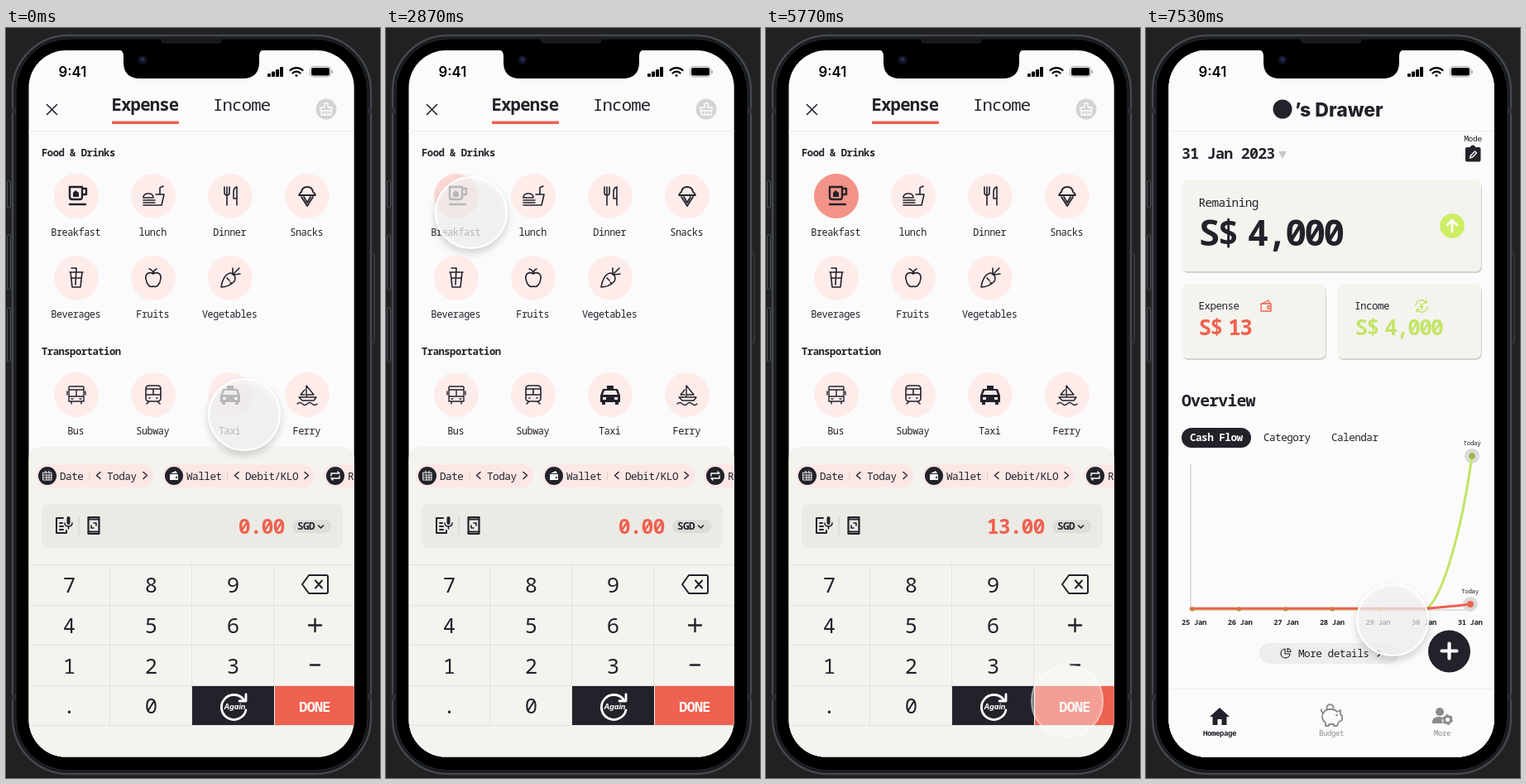
An HTML page for the animation above (7.56 s loop, 452 by 906 pixels).

```html
<!DOCTYPE html>
<html lang="en">
<head>
<meta charset="utf-8">
<title>Expense tracker</title>
<style>
  html, body { margin: 0; width: 100%; height: 100%; overflow: hidden; background: #212121 }
  svg { display: block; width: 452px; height: 906px }
  text { font-family: "Noto Sans Mono", "DejaVu Sans Mono", monospace; letter-spacing: -.04em; white-space: pre }
  .sans { font-family: Inter, "Open Sans", sans-serif; letter-spacing: 0 }
  .big { letter-spacing: -.07em }
  .line { fill: none; stroke: #21222a; stroke-width: 1.6; stroke-linecap: round; stroke-linejoin: round }
  .solid { fill: #21222a; fill-rule: evenodd }
</style>
</head>
<body>
<svg id="stage" viewBox="0 0 452 906"></svg>
<script>
const DARK = '#21222a', RED = '#ef6150', LIME = '#cdee62', PAPER = '#f4f3ee', BG = '#fbfbfb';
const LOOP = 7560, SCROLL = 457;

const plain = (x, y, size, str, o = '') => `<text x="${x}" y="${y}" font-size="${size}" fill="${DARK}" ${o}>${str}</text>`;
// slightly larger, tighter letters for the narrow mono look
const text = (x, y, size, str, o) => plain(x, y, size * 1.07, str, o);
const mid = (x, y, size, str, o = '') => text(x, y, size, str, 'text-anchor="middle" ' + o);
const end = (x, y, size, str, o = '') => text(x, y, size, str, 'text-anchor="end" ' + o);
const box = (x, y, x2, y2, r, fill, o = '') =>
  `<rect x="${x}" y="${y}" width="${x2 - x}" height="${y2 - y}" rx="${r}" fill="${fill}" ${o}/>`;
const dot = (x, y, r, fill, o = '') => `<circle cx="${x}" cy="${y}" r="${r}" fill="${fill}" ${o}/>`;
const line = (d, o = '') => `<path class="line" d="${d}" ${o}/>`;
const solid = (d, o = '') => `<path class="solid" d="${d}" ${o}/>`;
const at = (x, y, body) => `<g transform="translate(${x} ${y})">${body}</g>`;
const ink = (color, width) => `style="stroke:${color};stroke-width:${width}"`;
const paint = color => `style="fill:${color}"`;
const BOLD = 'font-weight="700"', SEMI = 'font-weight="600"', MED = 'font-weight="500"', THIN = 'font-weight="300"';

// ---- category list: label and icon, drawn around 0,0
const sections = [
  ['Food &amp; Drinks', [
    ['Breakfast', line('M-8-11H7V1q0 3-3 3H-5q-3 0-3-3zM7-9h5v7H7M-8 10H11', ink(DARK, 2.4)) + solid('M-4-4L-1-7 3-4V1H-4z')],
    ['lunch', line('M-12 2q0-5 6-5t6 5zM-12 5H2M-12 8H2M-12 11H10L13-2H3M8-2v-8l4-2')],
    ['Dinner', line('M-7-11v7q0 3 3 3t3-3v-7M-4-11V11M8 11V-11q-4 1-4 6V3H8')],
    ['Snacks', line('M-10-1q1-3 3-4 1-6 7-6t7 6q2 1 3 4zM-7 1L0 12 7 1M-4 1l4 7 4-7', ink(DARK, 1.8))],
    ['Beverages', line('M-8-7H8M-7-7L-5 11H5L7-7M-6 0H6M-1 8L0-12H-6')],
    ['Fruits', line('M0-5C-4-8-10-6-9 1-8 8-4 12 0 10 4 12 8 8 9 1 10-6 4-8 0-5zM0-5q0-4 4-6M0-6q-1-4-5-5')],
    ['Vegetables', line('M-11 11C-10 3-6-5 0-6 6-5 7 0 5 4 0 9-5 11-11 11zM3-4L11-12M5-4l7-1M3-6v-6M-4 0l3 3M0 5l2 2')]]],
  ['Transportation', [
    ['Bus', line('M-8-10H8q1 0 1 1V8H-9V-9q0-1 1-1zM-9-6H9M-9 2H9M0-6V2M-6 8v3M6 8v3M-11-4v4M11-4v4M-6 5h2M4 5h2', ink(DARK, 1.4))],
    ['Subway', line('M-9-7q0-4 4-4H5q4 0 4 4V4q0 4-4 4H-5q-4 0-4-4zM-9 0H9M0-7V0M-9-7H9M-5 8l-3 3M5 8l3 3M-5 4h1M4 4h1')],
    ['Taxi', solid('M-12 1L-9-7H-4V-11H4V-7H9L12 1V9H10V12H6V9H-6v3H-10V9H-12zM-9 0H9L7-5H-7zM-9 3h4v3h-4zM5 3h4v3H5z')],
    ['Ferry', line('M-10 3H11L8 7H-6zM-1 3V-11L8 0H-1M-3-6L-8 0h5M-12 11q3-3 6 0t6 0 6 0 6 0', ink(DARK, 1.4))]]],
  ['Health', [
    ['Medical', line('M-8-11H-10V-3a5 5 0 0 0 10 0V-11H-2M-5 2V5a6 5 0 0 0 13 0V1M5-2a3 3 0 1 0 6 0 3 3 0 1 0-6 0', ink(DARK, 2)), 'Check-up'],
    ['Medicine', line('M-10 3L3-10a5 5 0 0 1 7 7L-3 10a5 5 0 0 1-7-7zM-4-3l7 7')],
    ['Hospitalized', line('M-10-10V8H10V-1H-10M-10 4H10M-7 8v3M7 8v3M-5-1V-7H2v6M5-5h5')],
    ['Insurance', line('M0-11L8-8V0q0 6-8 10-8-4-8-10V-8zM-4-1l3 3 5-5')],
    ['Fitness', line('M-11 5a4 4 0 1 0 8 0 4 4 0 1 0-8 0M3 5a4 4 0 1 0 8 0 4 4 0 1 0-8 0M-7 5L-4-2H4M-10-4h7M3-11h4L4-2 7 5H-2L-4-2M-11 10H11', ink(DARK, 1.4))]]],
  ['Others', [
    ['Others', line('M-13-5a8 4 0 1 0 16 0 8 4 0 1 0-16 0v5c0 4 8 5 12 4M3-5V0M-3 2a8 4 0 1 0 16 0 8 4 0 1 0-16 0v4c0 6 16 6 16 0V2M-8-1v4M4 6v4M9 6v4', ink(DARK, 1.5))],
    ['Add', line('M-13 0H13M0-13V13')]]]
];

let list = '', y = 150.5;
for (const [title, items] of sections) {
  list += text(43, y + 4.5, 11.4, title, BOLD);
  y += 52.5;
  items.forEach(([label, icon, second], i) => {
    const x = 85 + 93 * (i % 4), cy = y + 99 * (i >> 2);
    list += dot(x, cy, 27, '#feeceb', label == 'Breakfast' ? 'id="picked"' : '') + at(x, cy, icon)
      + mid(x - .8, cy + 48, 11.1, label) + (second ? mid(x - .8, cy + 63.5, 11.1, second) : '');
  });
  y += 99 * ((items.length - 1) >> 2) + 88.5;
}

// ---- entry screen
const white = w => ink('#fff', w);
const arrows = (l, r) => line(`M${l + 2} 536.5l-4.5 4 4.5 4M${r - 2} 536.5l4.5 4-4.5 4`, ink(DARK, 1.5));
const chip = (x, x2, icon) => box(x, 527, x2, 555, 14, '#fce7e6') + dot(x + 14, 541, 11, DARK) + at(x + 14, 541, icon);

const chips = chip(36, 178, line('M-5-4H5V5H-5zM-5-1H5M-2-6v3M2-6v3M-5 2H5M-1-1V5M2-1V5', white(.9)))
  + text(65, 546, 11.9, 'Date') + text(122, 546, 11.9, 'Today') + arrows(112, 168)
  + chip(189, 373, solid('M-5-2H5V5H-5zM-4-3L2-6 4-3zM2 1h2v2H2z', paint('#fff')))
  + text(218, 546, 11.9, 'Wallet') + text(289, 546, 11.9, 'Debit/KLO') + arrows(279, 363)
  + line('M101 536.5v9M267.5 536.5v9', ink('#e0cfcd', 1))
  + chip(384, 440, line('M-5 0V-3H5L3-5M5 0V3H-5L-3 5', white(1.4))) + text(413, 546, 11.9, 'R');

const keys = ['789', '456', '123', '.0'].map((row, r) =>
  [...row].map((k, c) => mid(76 + 99 * c, 682 + 48.8 * r, 24, k)).join('')).join('');

const entry = `<g clip-path="url(#listClip)"><g id="list">${list}</g></g>`
  + line('M49.5 92.5l12 12M61.5 92.5l-12 12')
  + text(127.5, 100, 19.3, 'Expense', BOLD) + text(250, 100, 19.3, 'Income', THIN)
  + box(128, 112.5, 209, 116, 0, RED)
  + dot(387, 98, 12.5, '#d3d3d3') + at(387, 98, line('M-2-7H2V-2H7V2H-7V-2H-2zM-6 2V7H6V2M-2 7V4M2 7V4', white(1.3)))
  + line('M27 124.5H421', ink('#ececec', 1))
  + `<path fill="${PAPER}" d="M27 881V522q0-16 16-16H405q16 0 16 16V881z"/>` + chips
  + box(43, 575, 407, 628, 8, '#ebeae4')
  + at(69, 601, line('M0-9H-8V9H4V6M-4-3H-1M-4 1H0M-4 5H0', ink(DARK, 2)) + box(4.5, -11, 8.5, -1, 2, DARK) + line('M2-3q0 4 4.500 4t4.500-4M6.500 1V4'))
  + line('M88 590V612', ink('#d2d1cc', 1))
  + at(106, 601, line('M-6.5-10H6.5V10H-6.5zM-6-7.5H6M-6 7.5H6', ink(DARK, 2.2)) + line('M-3 0V3H0M0-3H3V0'))
  + end(336.5, 611, 23.3, '<tspan id="amount"></tspan>', `${SEMI} style="fill:${RED}"`)
  + box(346, 594, 393, 610, 8, '#dedcd7') + text(352, 606, 11.8, 'SGD', SEMI) + line('M377.5 601l3 3 3-3')
  + line('M27 648.5H421M27 697.5H421M27 745.5H421M27 794.5H421M27 842.5H421M125.5 648V842M224.5 648V842M323.5 648V842', ink('#e2e1dc', 1))
  + keys
  + at(374, 672, line('M-8-11H13q2 0 2 2V9q0 2-2 2H-8L-16 0zM0-4.5l8 9M8-4.5l-8 9', ink(DARK, 2)))
  + line('M366 721.5h15M373.5 714v15M368 769.5h11', ink(DARK, 2.4))
  + box(225, 795, 324, 842, 0, DARK) + box(325, 795, 421, 842, 0, RED)
  + line('M287 811A15 15 0 1 0 290 824M290 805v8h-8', white(2.8))
  + plain(276.5, 823, 9, 'Again', 'text-anchor="middle" class="sans" font-weight="700" font-style="italic" style="fill:#fff"')
  + mid(373, 826, 15.6, 'DONE', `${BOLD} style="fill:#fff"`);

// ---- bill screen
const tight = n => `word-spacing="${-n}"`;
const cat = line('M-23 15V-18q0-4 3-2l8 6H12l8-6q3-2 3 2V2M-21 20q0 7 7 7H16q6 0 6-5', ink(DARK, 4.5))
  + line('M-14 4q3-4 6 0M6 4q3-4 6 0M-2 9q5-1 3 3 3 1 0 5-1 2-4 1M-25 10l8 3M-25 22l8-4M-26 16h7', ink(DARK, 2.4))
  + solid('M18 21C10 15 10 10 14 8q3-1 5 2 4-5 8-1 2 5-9 12z') + solid('M-4 2h6l-3 3z');

const bill = box(27, 27, 421, 881, 0, BG) + box(78, 175, 371, 629, 20, PAPER)
  + dot(78, 349, 21, BG) + dot(371, 349, 21, BG)
  + line('M106 348H345', ink('#cbcac7', 1.8) + ' stroke-dasharray="5 5"')
  + dot(224, 174, 59.5, LIME, 'opacity=".48"') + dot(224, 174, 46, LIME) + at(224, 174, cat)
  + mid(228, 260, 14.2, 'Well Done!', `${SEMI} style="fill:#a9c450"`)
  + mid(228, 296, 21.4, 'Bill Confirmation', BOLD)
  + mid(228, 318, 12.55, 'Please verify if your bill', `${THIN} style="fill:#999"`)
  + mid(228, 332, 12.55, 'is accurate!', `${THIN} style="fill:#999"`)
  + text(97.5, 404, 14.8, 'Your Bill', paint('#9b9b9b')) + end(351, 403, 13.7, '31 Jan 23', paint('#9b9b9b'))
  + dot(101, 437, 3.2, RED) + text(114, 442, 14.8, 'Breakfast') + end(351, 442, 13.9, 'S$ 13', `${MED} ${tight(4)}`)
  + line('M99 580H351', ink('#cbcac7', 1.4))
  + text(97.5, 606, 15.4, 'Total', SEMI) + end(351, 604, 15.7, 'S$ 13.00', `${SEMI} ${tight(5)}`)
  + box(103, 699, 346, 747.5, 24, DARK) + mid(224.5, 728, 13.6, 'Correct', `${SEMI} style="fill:${LIME}"`)
  + box(103, 768, 346, 816.5, 24, '#c9c9cb') + mid(224.5, 797, 13.6, 'Modify', SEMI);

// ---- home screen
const GREY = '#8b8b8b';
const card = (x, y, x2, y2) => box(x + 1, y + 2, x2 + 1, y2 + 2, 7, '#d2d2d0') + box(x, y, x2, y2, 7, PAPER);
const days = [25, 26, 27, 28, 29, 30, 31];

const home = box(27, 27, 421, 881, 0, BG)
  + dot(165, 98, 11.5, DARK)
  + plain(180, 106.5, 23, '’s Drawer', 'class="sans" font-weight="800"')
  + line('M27 124.5H421', ink('#ececec', 1))
  + text(43, 158, 17.1, '31 Jan 2023', SEMI) + solid('M160 149h10l-5 9z', paint('#c6c6c6'))
  + mid(395, 137, 9, 'Mode')
  + box(386, 144, 404.5, 161.5, 2, DARK) + dot(395, 144.5, 3, DARK) + line('M391.5 157l1-3 5-5 2 2-5 5z', white(1.4))
  + card(43, 184, 405, 294)
  + text(63.5, 216, 13.4, 'Remaining') + text(63.5, 263, 40.5, 'S$ 4,000', `class="big" ${BOLD} ${tight(10)}`)
  + dot(370, 239, 14.8, LIME) + line('M370 246V232.5M364 238l6-6 6 6', white(2.8))
  + card(43, 309, 217, 399) + card(231, 309, 405, 399)
  + text(63.5, 340, 11.7, 'Expense') + text(63.5, 371, 24.6, 'S$ 13', `class="big" ${BOLD} ${tight(6)} style="fill:${RED}"`)
  + at(145, 336, line('M-6-3H6V6H-6zM-5-3L3-7 5-3M2 0H6V3H2z', ink(RED, 1.3)))
  + text(252, 340, 11.7, 'Income') + text(252.5, 371, 24.6, 'S$ 4,000', `class="big" ${BOLD} ${tight(6)} style="fill:#c3e466"`)
  + at(333, 336, line('M-7-1A7 7 0 0 1 5-5M7 1A7 7 0 0 1-5 5M6-7V-4H3M-6 7V4H-3M-2-3L0 0 2-3M0 0V4M-2 1H2', ink('#bfe05c', 1.3)))
  + text(43, 457, 18.5, 'Overview', SEMI)
  + box(43, 483, 127, 507, 12, DARK) + text(53, 498.5, 11.8, 'Cash Flow', `${SEMI} style="fill:#fff"`)
  + text(142, 498.5, 11.8, 'Category') + text(224, 498.5, 11.8, 'Calendar')
  + line('M54 528V703H392', ink('#dedede', 2))
  + dot(394, 517, 9, '#dadada') + dot(392, 696, 9, '#dadada')
  + line('M54 702H339C361 685 383 597 394 517', ink('#c3e466', 3))
  + days.slice(0, 6).map((d, i) => dot(56 + 56.4 * i, 702, 2.8, '#93ad45')).join('')
  + line('M54 701.3H339Q362 699.5 392 696', ink(RED, 3))
  + dot(394, 517, 3.8, '#9ab64c') + dot(392, 696, 4, RED)
  + mid(394, 504, 7, 'Today') + mid(391.5, 683, 7, 'Today')
  + days.map((d, i) => mid(58 + 55.6 * i, 721, 8.3, d + ' Jan', SEMI)).join('')
  + box(137, 743, 306, 768, 12.5, '#ededed')
  + at(169, 755, line('M-1-5a5.5 5.5 0 1 0 6 6H-1zM2-5.5q3.5 .5 4 4H2z', ink(DARK, 1.2)))
  + text(184, 760, 11.9, 'More details') + line('M280 752l4 3.5-4 3.5', ink(DARK, 1.3))
  + dot(366.5, 753, 25.5, DARK) + line('M357.5 752.5H375.5M366.5 743.5V761.5', white(4.2))
  + line('M27 798.5H421', ink('#ececec', 1))
  + solid('M89 821L101 832H97.5V842H91.5V835H86.5V842H80.5V832H77z')
  + mid(89, 855, 8.4, 'Homepage', BOLD)
  + at(224, 831, line('M-9-5C-6-9 4-9 7-5L11-7V-2L13 0V5L9 7 7 12H3V10H-3V12H-7V8C-12 5-12-1-9-5zM-9-4Q-13-4-12-8M-5-8a4 4 0 1 1 7 0M6-1h1', ink(GREY, 1.8)))
  + mid(224, 855, 8.4, 'Budget', paint(GREY))
  + at(358, 831, dot(-3, -5, 5, GREY) + solid('M-12 9V6Q-11 1-3 1L1 2Q-2 6 1 9z', paint(GREY))
    + dot(6.5, 4.5, 4, 'none', `stroke="${GREY}" stroke-width="3"`)
    + dot(6.5, 4.5, 5.7, 'none', `stroke="${GREY}" stroke-width="1.5" stroke-dasharray="3 3"`))
  + mid(358, 855, 8.4, 'More', paint(GREY));

// ---- phone
const side = (x, y, y2) => box(x, y, x + 4, y2, 1, '#1c1d1f', 'stroke="#4b4f55"');
const band = y => box(7, y, 12, y + 6, 0, '#2d3035') + box(437, y, 442, y + 6, 0, '#2d3035');
const phone = side(1.5, 185, 217) + side(1.5, 250, 316) + side(1.5, 338, 403) + side(441, 273, 380)
  + box(8, 9, 441, 901, 67, '#17191c', 'stroke="#43474d" stroke-width="2.5"')
  + box(12, 13, 437, 897, 63, '#000', 'stroke="#2b2e32"')
  + band(97) + band(805)
  + box(188, 13, 260, 18, 2.5, '#15171a', 'stroke="#222428"');

const bars = [4, 6.5, 9, 12].map((h, i) => box(316 + 5 * i, 59 - h, 320 + 5 * i, 59, 1, '#000')).join('');
const status = '<path d="M136 26q6 1 6 8V41q0 20 20 20H286q20 0 20-20V34q0-7 6-8z"/>'
  + dot(165, 38.5, 5.5, '#10131f') + dot(165, 38, 2.5, '#232a55')
  + plain(63.5, 59, 16.8, '9:41', 'class="sans" font-weight="600" style="fill:#000"')
  + bars + line('M343.5 51a11 11 0 0 1 15 0M346.5 54.5a6.5 6.5 0 0 1 9 0', ink('#000', 2.3)) + solid('M349 57q2-1.5 4 0l-2 2.2z', paint('#000'))
  + box(367.5, 46.5, 392.5, 59, 4, 'none', 'stroke="#aaa"') + box(369, 48, 391, 57.5, 2.5, '#000') + box(393.5, 51, 395, 55, 1, '#aaa');

document.getElementById('stage').innerHTML =
  `<clipPath id="screenClip">${box(27.5, 27, 420.7, 880.6, 45, '#000')}</clipPath>
  <clipPath id="listClip">${box(27, 125, 421, 520, 0, '#000')}</clipPath>${phone}
  <g clip-path="url(#screenClip)">${box(27, 27, 421, 881, 0, BG)}
  <g id="entry">${entry}</g><g id="bill">${bill}</g><g id="home">${home}</g>${status}</g>
  <g id="touch">${dot(0, 0, 43, '#fafafa', 'fill-opacity=".7" stroke="#fff" stroke-width="2.2"')}</g>`;

// ---- motion: monotone cubic through [time, value, ...] points
function track(points, t, k = 1) {
  const n = points.length - 1;
  if (t <= points[0][0]) return points[0][k];
  if (t >= points[n][0]) return points[n][k];
  const i = points.findIndex(p => p[0] > t) - 1;
  const grade = j => j < 0 || j >= n ? 0 : (points[j + 1][k] - points[j][k]) / (points[j + 1][0] - points[j][0]);
  const slope = j => {
    const a = grade(j - 1), b = grade(j);
    return a * b <= 0 ? 0 : 2 * a * b / (a + b);
  };
  const [a, b] = [points[i], points[i + 1]], h = b[0] - a[0], u = (t - a[0]) / h, v = 1 - u;
  return a[k] * v * v * (1 + 2 * u) + b[k] * u * u * (3 - 2 * u) + h * u * v * (v * slope(i) - u * slope(i + 1));
}

const touchPath = [[0, 288, 467], [180, 288, 467], [800, 235, 270], [1230, 213, 283], [1500, 205, 292],
  [2050, 210, 430], [2750, 103, 223], [3080, 103, 223], [3780, 100, 772], [4250, 100, 775], [4850, 284, 768],
  [5150, 284, 768], [5700, 364, 813], [6120, 364, 813], [6500, 337, 772], [6820, 250, 732], [7030, 250, 732], [7530, 298, 715]];
const pressPath = [[5600, 0], [5740, 1], [5800, 1], [5930, 0]];
const scrollPath = [[100, 0], [1050, SCROLL], [1500, SCROLL], [2250, 0]];
const el = id => document.getElementById(id);
const mix = (a, b, u) => `rgb(${a.map((c, i) => Math.round(c + (b[i] - c) * u))})`;

function draw(now) {
  const t = now % LOOP, press = track(pressPath, t), touch = el('touch');
  touch.setAttribute('transform', `translate(${track(touchPath, t)} ${track(touchPath, t, 2)})`);
  touch.style.opacity = 1 - .42 * press;
  touch.style.filter = `drop-shadow(0 5px 4px rgba(0,0,0,${.2 * (1 - press)}))`;
  el('list').setAttribute('transform', `translate(0 ${-track(scrollPath, t)})`);
  el('picked').setAttribute('fill', mix([254, 236, 235], [244, 147, 135], track([[2780, 0], [3080, 1]], t)));
  el('amount').textContent = t < 4050 ? '0.00' : t < 5080 ? '1.00' : '13.00';
  el('bill').style.opacity = track([[5920, 0], [6120, 1]], t);
  el('home').style.display = t < 6930 ? 'none' : '';
  requestAnimationFrame(draw);
}
draw(0);
</script>
</body>
</html>
```
